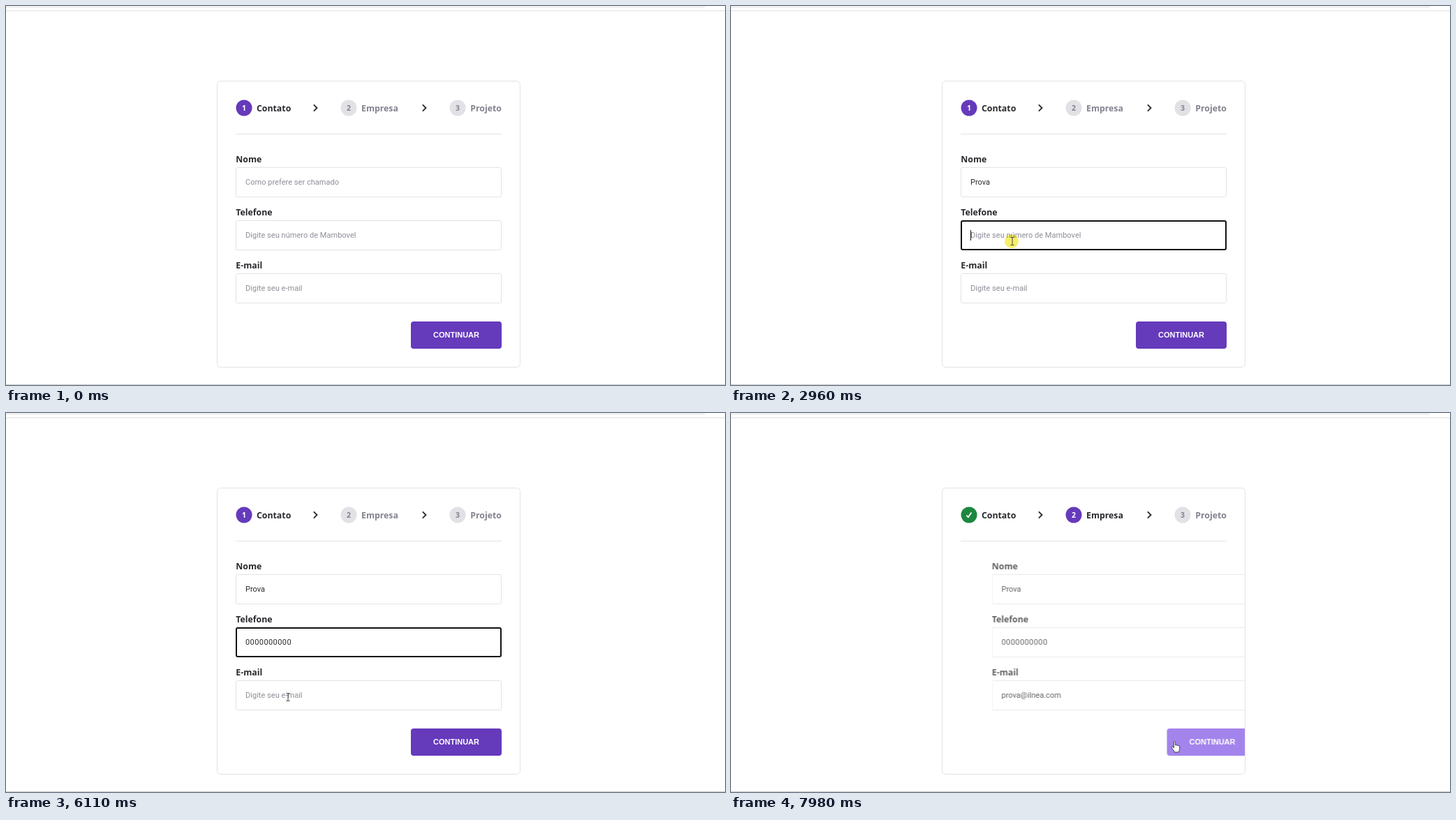
Recreate the animation shown at these times as an HTML page. Size 1030 px wide and 543 px high, loop 8 s.

```html
<!DOCTYPE html>
<html lang="pt-BR">
<head>
<meta charset="utf-8">
<title>Formulário em etapas</title>
<style>
  html, body { margin: 0; width: 100%; height: 100%; overflow: hidden; background: #fff; }
  svg { display: block; width: 1030px; height: 543px; }
  .bold { font: 700 12.3px "Noto Sans", sans-serif; fill: #29292e; }
  .num { font-size: 10.5px; fill: #fff; text-anchor: middle; }
  .off { fill: #83838f; }
  .text { font: 400 11px Roboto, sans-serif; letter-spacing: .03px; fill: #29292e; white-space: pre; }
  .digits { letter-spacing: .42px; }
  .hint { fill: #8d8d99; }
  .send { font: 700 11px "Liberation Sans", Arial, sans-serif; fill: #fff; text-anchor: middle; }
  .rule { fill: none; stroke: #e3e3e7; }
  .arrow { fill: none; stroke: #29292e; stroke-width: 1.8; }
  .pointer { fill: #fff; stroke: #333; stroke-width: .9; stroke-linejoin: round; }
  #halo { fill: #f6ef6a; mix-blend-mode: multiply; }
</style>
</head>
<body>
<svg viewBox="0 0 1030 543">
  <defs><clipPath id="inside"><rect x="303" y="108" width="433" height="409" rx="4.5"/></clipPath></defs>

  <rect x="-10" y="-10" width="1013" height="13" rx="5" fill="#f1f1f2"/>
  <path d="M0 6.8H1030" stroke="#dedee0"/>
  <path d="M0 542.5H1030" stroke="#cbcbcd"/>

  <rect class="rule" x="302.5" y="107.5" width="434" height="410" rx="5"/>
  <path class="rule" d="M329 183.5H710"/>
  <path class="arrow" d="M440.8 141.4l4.7 4.6-4.7 4.6M596.8 141.4l4.7 4.6-4.7 4.6"/>
  <g id="steps"></g>
  <g clip-path="url(#inside)">
    <g id="panel">
      <g id="fields"></g>
      <rect id="button" x="580" y="452" width="130" height="39" rx="4"/>
      <text class="send" x="645" y="475">CONTINUAR</text>
    </g>
  </g>

  <circle id="halo" r="10"/>
  <g id="cursor">
    <path id="beam" fill="none" stroke="#444" d="M-2.5-5.5h2l.5.7.5-.7h2M0-5V5M-2.5 5.5h2l.5-.7.5.7h2"/>
    <path id="tip" class="pointer" d="M0 0v10.2l2.4-2.2 1.8 4.3 1.8-.8-1.8-4.1h3.3z"/>
    <path id="hand" class="pointer" d="M-1.1 9V1c0-1.5 2.3-1.5 2.3 0v4.2c.5-.9 2.1-.7 2.2.4.6-.7 1.9-.4 2 .6.7-.5 1.8-.1 1.8 1v3.3c0 1.7-1.2 2.3-1.2 4.7H-.2c0-2-2.6-4-3.9-6.3-.6-1.4.9-2 1.8-1.1z"/>
  </g>
</svg>

<script>
const LOOP = 8000, BLINK = 540, LEFT = 343;
const PURPLE = '#653abb', HOVER = '#8257e5', GREEN = '#1b873f', GREY = '#e1e1e6';
const $ = id => document.getElementById(id);

function add(parent, tag, attrs, text = '') {
  const el = document.createElementNS('http://www.w3.org/2000/svg', tag);
  for (const key in attrs) el.setAttribute(key, attrs[key]);
  el.textContent = text;
  return parent.appendChild(el);
}
const show = (el, on) => el.setAttribute('visibility', on ? 'visible' : 'hidden');

// Header
const steps = [['Contato', 341, 359], ['Empresa', 491, 509], ['Projeto', 647, 665.3]]
  .map(([name, cx, x], i) => ({
    disc: add($('steps'), 'circle', { cx, cy: 146, r: 11.5 }),
    num: add($('steps'), 'text', { x: cx, y: 150 }, i + 1),
    name: add($('steps'), 'text', { x, y: 150.7 }, name)
  }));
const check = add($('steps'), 'path',
  { d: 'M337.3 146.6l2.5 2.7 4.6-6.8', fill: 'none', stroke: '#fff', 'stroke-width': 1.8 });

// Form: keys holds the time of each typed character; a single time pastes the whole value
const fields = [
  { label: 'Nome', hint: 'Como prefere ser chamado', value: 'Prova',
    focus: 550, blur: 2960, keys: [1490, 1700, 1890, 2030, 2080] },
  { label: 'Telefone', hint: 'Digite seu número de Mambovel', value: '0000000000', style: ' digits',
    focus: 2960, blur: 6180,
    keys: [3970, 4170, 4300, 4430, 4630, 4770, 4890, 5090, 5290, 5490] },
  { label: 'E-mail', hint: 'Digite seu e-mail', value: 'prova@ilnea.com',
    focus: 6180, blur: 7850, keys: [6910] }
];
fields.forEach((f, i) => {
  const g = add($('fields'), 'g', { transform: `translate(0 ${76 * i})` });
  add(g, 'text', { class: 'bold', x: 329.3, y: 224.4 }, f.label);
  add(g, 'rect', { class: 'rule', x: 329.5, y: 231.5, width: 380, height: 42, rx: 2 });
  f.ring = add(g, 'rect', { x: 330, y: 232, width: 379, height: 41, rx: 2,
    fill: 'none', stroke: '#111', 'stroke-width': 2 });
  f.text = add(g, 'text', { x: LEFT, y: 256.4 });
  f.caret = add(g, 'rect', { y: 245, width: 1, height: 15, fill: '#111' });
});

// Pointer moves: start, end, jumps, from, to, easing
const ease = {
  both: p => p * p * (3 - 2 * p),
  in: p => p ** 1.5,
  out: p => 1 - (1 - p) ** 2
};
const moves = [
  [70, 410, 6, [541, 358], [392.3, 248], 'both'],
  [2560, 2760, 4, [392.3, 248], [403, 337], 'both'],
  [5560, 6040, 8, [403, 337], [404, 407], 'both'],
  [6980, 7180, 4, [404, 407], [482, 437], 'in'],
  [7250, 7710, 8, [482, 437], [635.5, 470.8], 'out']
];
const clicks = [[550, 610], [2960, 3090], [6180, 6310], [7850, 7980]];

function pointerAt(t) {
  const [start, end, jumps, a, b, kind] = moves.filter(m => t >= m[0]).pop() || moves[0];
  const jump = 1 + Math.floor((t - start) / (end - start) * (jumps - 1) + 1e-6);
  const p = ease[kind](Math.max(0, Math.min(1, jump / jumps)));
  return a.map((v, i) => v + (b[i] - v) * p);
}

function drawSteps(done) {
  const current = done ? 1 : 0;
  steps.forEach(({ disc, num, name }, i) => {
    disc.setAttribute('fill', i < current ? GREEN : i === current ? PURPLE : GREY);
    num.setAttribute('class', 'bold num' + (i > current ? ' off' : ''));
    name.setAttribute('class', 'bold' + (i > current ? ' off' : ''));
    show(num, i >= current);
  });
  show(check, done);
}

function drawField(f, t) {
  const typed = f.keys.filter(k => t >= k);
  const text = f.keys.length === 1 && typed.length ? f.value : f.value.slice(0, typed.length);
  const active = t >= f.focus && t < f.blur;
  f.text.textContent = text || f.hint;
  f.text.setAttribute('class', 'text' + (text ? f.style || '' : ' hint'));
  show(f.ring, active);
  const since = t - (typed.pop() || f.focus);
  show(f.caret, active && Math.floor(since / BLINK) % 2 === 0);
  f.caret.setAttribute('x', LEFT + (text ? Math.round(f.text.getComputedTextLength()) : 0));
}

function drawPointer(t) {
  const [x, y] = pointerAt(t);
  const visible = t >= 70;
  const over = (x0, y0, x1, y1) => x >= x0 && x <= x1 && y >= y0 && y <= y1;
  const onField = fields.some((f, i) => over(329, 231 + 76 * i, 710, 274 + 76 * i));
  const onButton = over(580, 452, 710, 491);
  $('cursor').setAttribute('transform', `translate(${x} ${y})`);
  show($('beam'), visible && onField);
  show($('hand'), visible && onButton);
  show($('tip'), visible && !onField && !onButton);
  $('button').setAttribute('fill', onButton ? HOVER : PURPLE);
  $('halo').setAttribute('cx', x - 1);
  $('halo').setAttribute('cy', y);
  show($('halo'), clicks.some(([a, b]) => t >= a && t < b));
}

function draw(t) {
  drawSteps(t >= 7910);
  fields.forEach(f => drawField(f, t));
  drawPointer(t);
  const [shift, alpha] = t >= 7980 ? [44.5, .73] : t >= 7910 ? [12, .93] : [0, 1];
  $('panel').setAttribute('transform', `translate(${shift} 0)`);
  $('panel').setAttribute('opacity', alpha);
}

const begin = performance.now();
function tick() {
  draw((performance.now() - begin) % LOOP);
  requestAnimationFrame(tick);
}
tick();
</script>
</body>
</html>
```
